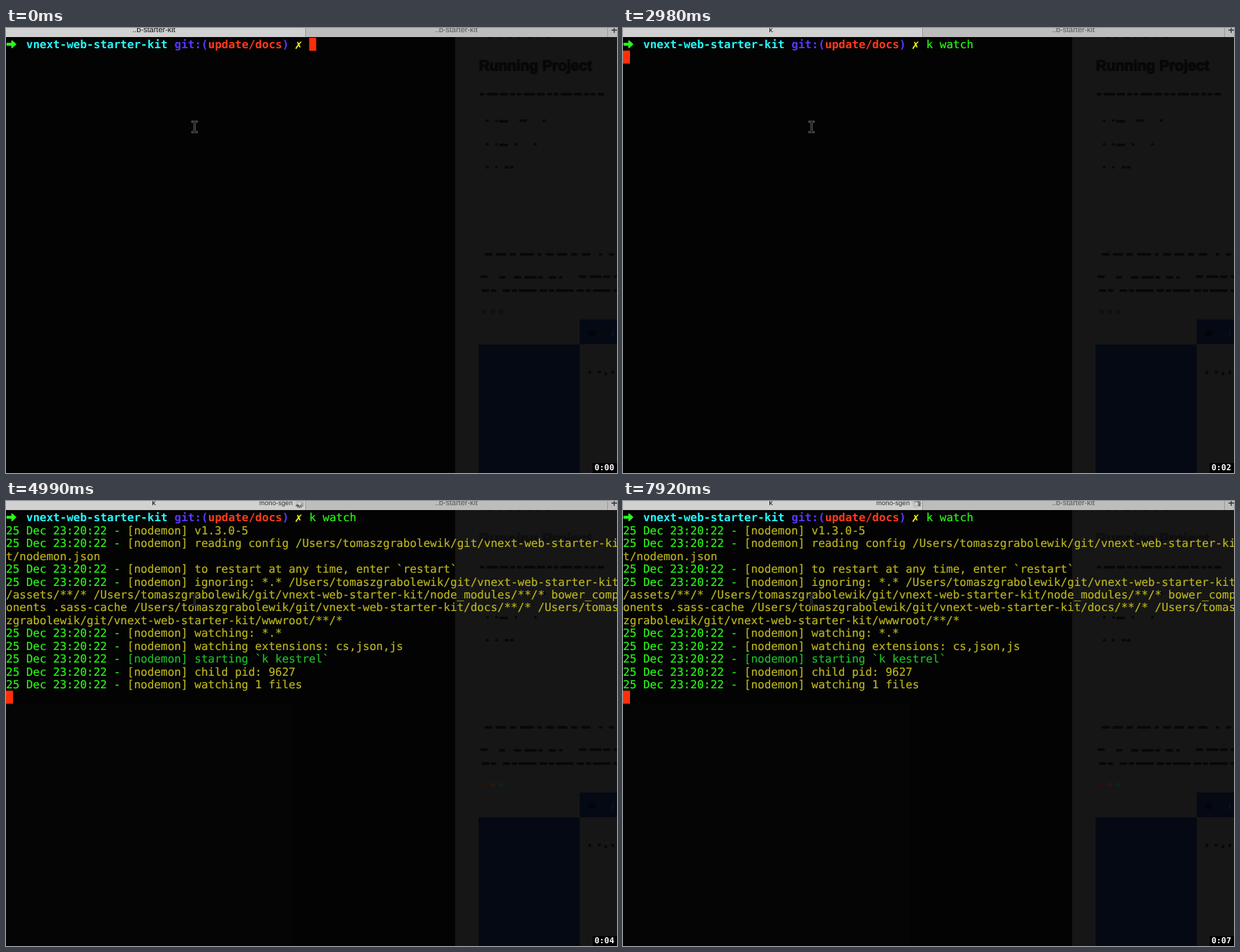
Animation, 876 px wide and 639 px high, one loop 8000 ms. Source, as an HTML page:

```html
<!DOCTYPE html>
<html lang="en">
<head>
<meta charset="utf-8">
<title>Terminal session</title>
<style>
html, body { margin: 0; width: 100%; height: 100%; overflow: hidden; background: #030303; }
svg { display: block; position: absolute; left: 0; top: 0; }
text { white-space: pre; font: 16.05px "DejaVu Sans Mono", "DejaVu Sans", monospace; text-rendering: geometricPrecision; }
.prompt text { font-weight: bold; }
.prompt .cross { font-size: 18px; }
.cmd, .stamp { color: #29f814; }
.warn { color: #bbb51e; }
.ok { color: #1fbd2a; }
.cmd, .stamp, .warn, .ok { fill: currentColor; stroke: currentColor; stroke-width: .2; }
.tab { font: 11px "Liberation Sans", sans-serif; text-anchor: middle; }
.job { font: 9.6px "Liberation Sans", sans-serif; text-anchor: end; fill: #333; }
.clock text { font: bold 11.7px "DejaVu Sans Mono", monospace; fill: #fff; }
.page text { font: bold 21px "Liberation Sans", sans-serif; }
.page .ink { fill: none; stroke: #080808; stroke-width: 4; stroke-linecap: round; }
.detail text { font: 14px "Open Sans", sans-serif; fill: #090909; }
.detail .far text { font-weight: bold; fill: #0d0d0d; }
.detail .bold { font: bold 21px "Liberation Sans", sans-serif; }
.detail .code { font: 12px "DejaVu Sans Mono", monospace; }
.detail .small { font-size: 11px; }
.detail .big { font: 36px "Liberation Sans", sans-serif; }
</style>
</head>
<body>
<svg id="stage" width="876" height="639" viewBox="0 0 876 639">
  <rect width="876" height="639" fill="#030303"/>

  <g class="page">
    <rect x="644" y="13" width="232" height="626" fill="#161616"/>
    <path class="ink" style="stroke-width:1.5" d="M692 13.5H780" stroke-dasharray="5 9 2 12"/>
    <text id="heading" x="678" y="61" fill="#080808" stroke="#080808" stroke-width="1.4">Running Project</text>
    <g id="inks"></g>
    <g id="dots"></g>
    <path fill="#040914" d="M677.5 454.5H822.5V639H677.5ZM822.5 418.5H876V454H822.5Z"/>
    <ellipse cx="840" cy="438" rx="6" ry="4.5" fill="#040508"/>
    <path fill="#0a1222" d="M869 433h2v10h-2z"/>
  </g>

  <g class="detail" id="detail">
    <path fill="#020202" d="M444 14H643V635H444Z"/>
    <path fill="#131313" d="M644 14H872V635H644Z"/>
    <g class="far">
      <text x="444" y="48">tion with these steps</text>
      <text x="444" y="279">s.com/modules/kmon)</text>
      <text x="444" y="301">nodemon. So make sure</text>
      <text x="444" y="322">gest</text>
      <text x="444" y="427">Brindex now!</text>
      <text x="444" y="554">sync tool watching for</text>
    </g>
    <text class="bold" x="678" y="61">Running Project</text>
    <text class="small" x="679" y="99" stroke="#090909">At this point you should be able to run</text>
    <g id="code"></g>
    <path fill="#0e0e0e" d="M678 247h3v53h-3z"/>
    <g opacity=".45">
      <text class="code" x="693" y="258">Once the project runs, open a</text>
      <text class="code" x="693" y="278">an address. Redirected to</text>
      <text class="code" x="693" y="298">screen, and example is in</text>
    </g>
    <g stroke="#090909" stroke-width=".5">
      <text class="small" x="678" y="329">The project listens by default to port</text>
      <text class="small" x="679" y="361">You can see each page in the browser</text>
      <text class="small" x="681" y="381">using the same sync tool watching for</text>
    </g>
    <path fill="#101010" d="M678 400H872V418H678Z"/>
    <path stroke="#0a0a0a" stroke-width="8" stroke-dasharray="9 3 7 5 2 12" d="M682 408H860"/>
    <path fill="#040812" d="M678 455H822V635H678Z"/>
    <path fill="#050b1c" d="M823 419H872V453H823Z"/>
    <ellipse cx="840" cy="438" rx="6" ry="5" fill="#020306"/>
    <text class="small" x="687" y="442" opacity=".5">Navigation</text>
    <g opacity=".6">
      <text class="small" x="687" y="476" style="fill:#0e1526">Home</text>
      <text class="small" x="687" y="512" style="fill:#0e1526">Get Started</text>
      <text class="small" x="687" y="549" style="fill:#0e1526">Read more</text>
    </g>
    <text class="big" x="833" y="506">Ho</text>
    <text class="small" x="833" y="547">Welcome</text>
    <text class="bold" x="833" y="590" style="font-weight:400">Get</text>
    <text class="small" x="833" y="629">Follow</text>
  </g>
  <rect id="patch" y="292" width="411" height="347" fill="#050505"/>

  <g class="tabs">
    <rect width="429" height="13" fill="#d1d1d1"/>
    <rect x="429" width="447" height="13" fill="#bdbdbd"/>
    <path stroke="#999" d="M429.5 0V13M862.5 0V13"/>
    <path stroke="#333" stroke-width="1.4" d="M868 3H876M872 0V7"/>
    <text class="tab" id="title" x="212" y="6" fill="#111">..b-starter-kit</text>
    <text class="tab" id="running" x="212" y="6" fill="#111">k</text>
    <text class="tab" x="645.5" y="6" fill="#555">..b-starter-kit</text>
    <text class="job" id="node" x="411" y="6">node</text>
    <text class="job" id="mono" x="411" y="6">mono-sgen</text>
    <g id="busy" transform="translate(421 4)"><g id="spin" stroke="#1c1c1c" stroke-width="1.3" stroke-linecap="round"></g></g>
  </g>

  <g class="prompt">
    <path fill="#2cf51e" d="M1 21.3H7.6V18.2Q8.4 17.2 9.6 18.2L15 23.3L9.6 28.6Q8.4 29.5 7.6 28.4V25.4H1Q0 23.3 1 21.3Z"/>
    <text x="29" y="29.2" fill="#25f9fb">vnext-web-starter-kit</text>
    <text x="241.5" y="29.2" fill="#5a36ff">git:(<tspan fill="#ff3b1c">update/docs</tspan>)</text>
    <text class="cross" x="414" y="29.8" fill="#fbf41c">✗</text>
  </g>
  <g class="cmd" id="cmd"></g>
  <g id="log"></g>
  <rect id="cursor" y="14" width="10" height="18.7" fill="#ff2f0a"/>

  <g fill="none" stroke-linecap="round">
    <path id="beam" stroke="#6a6a6a" stroke-width="3" d="M267 134.5Q270.3 134.5 270.3 137V147Q270.3 149.5 267 149.5M273.6 134.5Q270.3 134.5 270.3 137M270.3 147Q270.3 149.5 273.6 149.5"/>
    <path stroke="#0a0a0a" stroke-width="1.2" d="M267 134.5Q270.3 134.5 270.3 137V147Q270.3 149.5 267 149.5M273.6 134.5Q270.3 134.5 270.3 137M270.3 147Q270.3 149.5 273.6 149.5"/>
  </g>

  <g class="clock" id="clock"><rect x="841" y="625" width="35" height="14" fill="#000"/></g>
</svg>
<script>
const LOOP = 8000, COL = 9.66, ROW = 18.46, BASE = 29.2, COLS = 91;
const ENTER = 2980, SPIN = 3530, OUTPUT = 3970;
const $ = id => document.getElementById(id);

function add(parent, tag, attrs, content = '') {
  const el = document.createElementNS('http://www.w3.org/2000/svg', tag);
  for (const key in attrs) el.setAttribute(key, attrs[key]);
  el.textContent = content;
  return parent.appendChild(el);
}

// Holds each value from its time until the next one: [[ms, value], ...]
function hold(el, prop, list) {
  const frames = list.map(([ms, value]) => ({ offset: ms / LOOP, [prop]: value, easing: 'step-end' }));
  frames.push({ offset: 1, [prop]: list[list.length - 1][1] });
  el.animate(frames, { duration: LOOP, iterations: Infinity });
}

// Times alternate between appearing and disappearing
function show(el, ...times) {
  const list = times.map((ms, i) => [ms, i % 2 ? 'hidden' : 'visible']);
  if (times[0] > 0) list.unshift([0, 'hidden']);
  hold(el, 'visibility', list);
}

// Page behind the terminal
[
  [95, 'M681 95H856', '3 7 13 6 8 7 3 6'],
  [133, 'M690 133h.1M703 133h.1M709 134h9M738 133h2M744 133h1M771 133h1'],
  [167, 'M690 167h.1M703 167h.1M709 168h9M731 167h.1M759 167h.1'],
  [200, 'M690 200h.1M703 200h.1M717 200h2M724 200h2'],
  [325, 'M688 325H836M852 325h1M866 325h4', '8 8 11 9 5 10 16 9 2 10'],
  [357, 'M682 357H690M709 358h5M730 358H768M780 358h16M823 357H874', '7 8 14 6'],
  [377, 'M684 377H704M714 377H874', '7 6 4 6 22 8'],
  [494, 'M837 494v1M850 494h1M860 496v1M870 494v1']
].forEach(([, d, dash = 'none']) => add($('inks'), 'path', { class: 'ink', d, 'stroke-dasharray': dash }));

['#260f0f', '#201c0c', '#0b231f'].forEach((color, i) => {
  const dot = add($('dots'), 'circle', { cx: 686 + 12 * i, cy: 407.5, r: 3.3 });
  hold(dot, 'fill', [[0, '#101010'], [SPIN, '#0d1716'], [OUTPUT, color]]);
});
hold($('heading'), 'opacity', [[0, 1], [OUTPUT, .5]]);

['$ npm install', '[...]', '$ npm build', '[...]', '$ k watch', '[...]'].forEach((line, i) =>
  add($('code'), 'text', { class: 'code', x: 686, y: 138 + 16.8 * i }, line));
show($('detail'), 2000, ENTER);
show($('patch'), 4520);

// Typed command
const keys = [1820, 2000, 2120, 2240, 2370, 2600, 2750];
[...'k watch'].forEach((char, i) => {
  if (char !== ' ') show(add($('cmd'), 'text', { x: COL * (45 + i), y: BASE }, char), keys[i]);
});

// Cursor
const place = (col, row) => `translate(${COL * col}px, ${ROW * row}px)`;
hold($('cursor'), 'transform', [
  [0, place(45, 0)],
  ...keys.map((ms, i) => [ms, place(46 + i, 0)]),
  [ENTER, place(0, 1)],
  [OUTPUT, place(0, 14)]
]);
show($('cursor'), 0, 510, 960, 1470, 1820, SPIN, OUTPUT, 4090, 4520, 5132, 5566, 6010, 6582, 7050, 7485);

// Program output, wrapped at the terminal width
const stamp = '25 Dec 23:20:22 - ';
const home = '/Users/tomaszgrabolewik/git/vnext-web-starter-kit';
let row = 1;
[
  'v1.3.0-5',
  `reading config ${home}/nodemon.json`,
  'to restart at any time, enter `restart`',
  `ignoring: *.* ${home}/assets/**/* ${home}/node_modules/**/* bower_components .sass-cache ${home}/docs/**/* ${home}/wwwroot/**/*`,
  'watching: *.*',
  'watching extensions: cs,json,js',
  'starting `k kestrel`',
  'child pid: 9627',
  'watching 1 files'
].forEach(message => {
  const line = `${stamp}[nodemon] ${message}`;
  const tone = message.startsWith('starting') ? 'ok' : 'warn';
  for (let at = 0; at < line.length; at += COLS, row++) {
    const text = add($('log'), 'text', { x: 0, y: BASE + ROW * row });
    if (!at) add(text, 'tspan', { class: 'stamp' }, stamp);
    add(text, 'tspan', { class: tone }, line.slice(at || stamp.length, at + COLS));
  }
});
show($('log'), OUTPUT);
hold($('beam'), 'stroke', [[0, '#6a6a6a'], [OUTPUT, '#444']]);

// Tab titles and activity spinner
show($('title'), 0, ENTER);
show($('running'), ENTER);
show($('node'), SPIN, OUTPUT);
show($('mono'), OUTPUT);
show($('busy'), SPIN);
for (let i = 0; i < 12; i++) {
  add($('spin'), 'path', { d: 'M0 -3V-5.8', transform: `rotate(${-30 * i})`, opacity: Math.max(.16, 1 - i * .12) });
}
const run = (from, to, count) => Array.from({ length: count }, (_, i) => from + (to - from) * i / (count - 1));
const ticks = [
  ...run(3530, 3770, 3), ...run(3970, 4090, 2), ...run(4230, 4520, 3),
  ...run(4700, 5710, 8), 5830, ...run(6010, 6870, 7), ...run(7050, 7920, 7)
];
const turn = ms => `rotate(${210 + 30 * Math.round((ms - 3770) / 93)}deg)`;
hold($('spin'), 'transform', [[0, turn(0)], ...ticks.map(ms => [ms, turn(ms)])]);

// Elapsed time
const seconds = [0, 1080, 2000, 3160, 4090, 5132, 6150, 7050];
seconds.forEach((ms, i) => {
  const label = add($('clock'), 'text', { x: 843.8, y: 635.3 }, `0:0${i}`);
  show(label, ...seconds.slice(i, i + 2));
});
</script>
</body>
</html>
```
